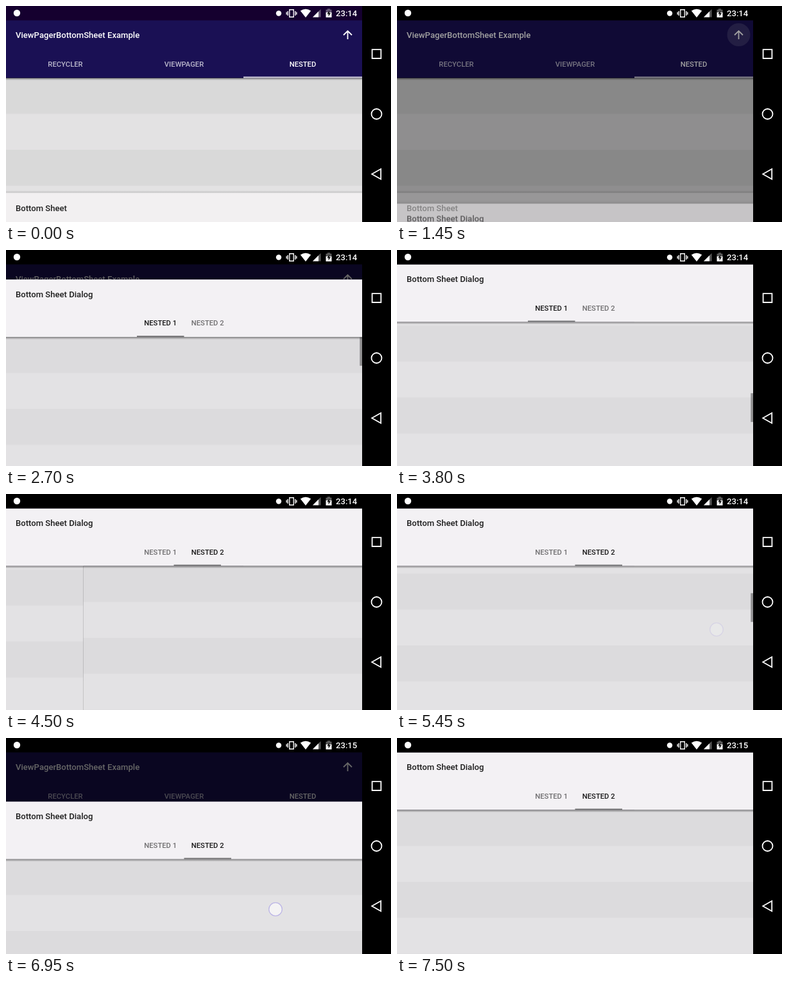
An HTML page that plays this animation: 600x338 px, repeating every 8 s.

```html
<!DOCTYPE html>
<html lang="en">
<head>
<meta charset="utf-8">
<title>Bottom sheet demo</title>
<style>
html, body { margin: 0; width: 100%; height: 100%; overflow: hidden; background: #000; }
#stage { display: block; }
text { font: 500 13.1px Roboto, sans-serif; }
.tab { font-size: 11.25px; text-anchor: middle; }
</style>
</head>
<body>
<svg id="stage" width="600" height="338" viewBox="0 0 600 338">
  <defs>
    <pattern id="mainRows" width="555" height="112.5" patternUnits="userSpaceOnUse">
      <rect width="555" height="112.5" fill="#e3e2e3"/>
      <rect width="555" height="56.25" fill="#d9d9d9"/>
    </pattern>
    <pattern id="pageRows" width="555" height="112.5" patternUnits="userSpaceOnUse">
      <rect width="555" height="112.5" fill="#e3e2e4"/>
      <rect width="555" height="56.25" fill="#dcdbdd"/>
    </pattern>
    <linearGradient id="below" x2="0" y2="1">
      <stop stop-opacity=".4"/><stop offset="1" stop-opacity="0"/>
    </linearGradient>
    <linearGradient id="above" x2="0" y2="1">
      <stop stop-opacity="0"/><stop offset="1" stop-opacity=".15"/>
    </linearGradient>
  </defs>

  <svg width="555" height="338">
    <svg y="112.5" width="555" height="226"><rect width="555" height="1125" fill="url(#mainRows)"/></svg>
    <rect y="112.5" width="555" height="4" fill="url(#below)"/>
    <rect y="22" width="555" height="90.5" fill="#1a1054"/>
    <g fill="#fff">
      <text x="15" y="50">ViewPagerBottomSheet Example</text>
      <g class="tabs">
        <text class="tab" x="92.5" y="94.5" opacity=".7">RECYCLER</text>
        <text class="tab" x="277.5" y="94.5" opacity=".7">VIEWPAGER</text>
        <text class="tab" x="462.5" y="94.5">NESTED</text>
      </g>
      <rect x="370" y="110.6" width="185" height="1.9" fill="#e8e6ee"/>
      <circle id="ripple" cx="532.5" cy="45" r="18"/>
      <path d="M532.5 52V39.5M526 45.5L532.5 39L539 45.5" fill="none" stroke="#fff" stroke-width="1.8"/>
    </g>
    <rect y="288.5" width="555" height="4" fill="url(#above)"/>
    <rect y="292.5" width="555" height="46" fill="#f2f0f1"/>
    <text x="15" y="320.7" fill="#212121">Bottom Sheet</text>
    <rect id="scrim" y="22" width="555" height="316"/>

    <g id="sheet">
      <rect y="-5" width="555" height="5" fill="url(#above)"/>
      <svg y="90" width="555" height="226">
        <g id="pager">
          <rect id="page1" width="555" height="1125" fill="url(#pageRows)"/>
          <g transform="translate(555)"><rect id="page2" width="555" height="1125" fill="url(#pageRows)"/></g>
        </g>
        <rect id="bar" x="551.3" width="3.7" height="45" fill="#000"/>
      </svg>
      <rect y="90" width="555" height="4" fill="url(#below)"/>
      <rect width="555" height="90" fill="#f3f1f4"/>
      <text x="15" y="27.5" fill="#1d1d1d">Bottom Sheet Dialog</text>
      <text class="tab" id="tab1" x="240.7" y="72">NESTED 1</text>
      <text class="tab" id="tab2" x="314.2" y="72">NESTED 2</text>
      <rect id="marker" y="88.1" width="73.5" height="1.9" fill="#707072"/>
    </g>
  </svg>

  <rect id="status" width="555" height="22.5"/>
  <g fill="#fff">
    <circle cx="17" cy="11" r="5.2"/>
    <circle cx="425" cy="11.5" r="4.2"/>
    <path d="M441.8 5.7h6.4v11.6h-6.4zM439.2 8v7M450.8 8v7M437.2 9.5v4M452.8 9.5v4" fill="none" stroke="#fff" stroke-width="1.4"/>
    <path d="M467 18L458.8 7.6Q467 1.8 475.2 7.6Z"/>
    <path d="M490.5 5V17.5H478Z" opacity=".35"/>
    <path d="M487 8.5V17.5H478Z"/>
    <path d="M498.5 5.7h2.3v-1.4h4.4v1.4h2.3v4.3h-9z" opacity=".35"/>
    <path d="M498.5 10h9v7.8h-9z"/>
    <path d="M504 7L500.3 12.4h2.3V16.4L506 11h-2z" fill="#111"/>
    <text id="clock" x="514" y="16.3"></text>
  </g>
  <path d="M555 0h45v338h-45z"/>
  <g fill="none" stroke="#fff" stroke-width="1.8">
    <path d="M570.6 68.2h13.8v13.8h-13.8zM570.2 263L584.2 255V271Z"/>
    <circle cx="577.5" cy="169" r="8"/>
  </g>
  <circle id="dot" r="10.3" fill="#fff" fill-opacity=".6" stroke="#bdb6e6" stroke-width="1.3"/>
</svg>

<script>
const LOOP = 8000, TOP = 22.5, PEEK = 278, ROWS = 1125, VIEW = 225.5;

// start, end, x0, y0, x1, y1
const touches = [
  [1100, 1200, 533, 45, 533, 45],
  [2280, 2450, 480, 290, 480, 226],
  [3250, 3350, 457, 282, 495, 226],
  [4120, 4300, 440, 197, 218, 197],
  [5250, 5350, 462, 266, 498, 212],
  [6100, 6200, 490, 205, 470, 262],
  [6650, 6950, 418, 190.5, 420, 268],
];
const barTimes = [[1250, 2700], [3250, 3850], [5250, 5850], [6100, 6600]];

const $ = id => document.getElementById(id);
const set = (id, attrs) => {
  for (const k in attrs) $(id).setAttribute(k, attrs[k]);
};
const seg = (t, a, b) => Math.min(1, Math.max(0, (t - a) / (b - a)));
const out = (t, a, b, k = 3) => 1 - (1 - seg(t, a, b)) ** k;
const smooth = (t, a, b) => (1 - Math.cos(Math.PI * seg(t, a, b))) / 2;
const mix = (a, b, u) => a + (b - a) * u;
const move = (x, y) => ({ transform: `translate(${x} ${y})` });
// opaque from a to b, then fades
const hold = (t, a, b, fade) => t < a ? 0 : 1 - seg(t, b, b + fade);

function sheetTop(t) {
  if (t < 2280) return PEEK + 63 * (1 - smooth(t, 1250, 1650));
  if (t < 6000) return mix(mix(PEEK, 214, seg(t, 2280, 2450)), TOP, out(t, 2450, 2950));
  return TOP + 77.5 * (seg(t, 6650, 6950) - out(t, 6950, 7450));
}

function draw(t) {
  const open = t >= 1250;
  set('status', { fill: open ? '#000' : '#15002f' });
  set('ripple', { opacity: 0.13 * seg(t, 1100, 1250) * (1 - seg(t, 1500, 1850)) });
  set('scrim', { opacity: 0.6 * seg(t, 1250, 1575) });
  set('sheet', { ...move(0, sheetTop(t)), opacity: smooth(t, 1250, 1650) });

  const page = 0.4 * seg(t, 4120, 4300) + 0.6 * out(t, 4300, 5000);
  const scroll1 = 556.75 * out(t, 3270, 3800, 1.7);
  const scroll2 = 419 * (out(t, 5270, 5800, 1.7) - out(t, 6120, 6600, 1.7));
  set('pager', move(-555 * page, 0));
  set('page1', move(0, -scroll1));
  set('page2', move(0, -scroll2));
  set('marker', { x: 204 + 73.5 * page });
  set('tab1', { 'fill-opacity': page < 0.5 ? 0.9 : 0.54 });
  set('tab2', { 'fill-opacity': page < 0.5 ? 0.54 : 0.9 });
  set('bar', {
    y: (page < 0.5 ? scroll1 : scroll2) / ROWS * VIEW,
    opacity: 0.35 * Math.max(...barTimes.map(([a, b]) => hold(t, a, b, 200))),
  });

  const [a, b, x0, y0, x1, y1] = touches.findLast(g => t >= g[0]) || touches[0];
  const u = seg(t, a, b);
  set('dot', { cx: mix(x0, x1, u), cy: mix(y0, y1, u), opacity: hold(t, a, b, 150) });
  $('clock').textContent = t < 5700 ? '23:14' : '23:15';
}

function tick() {
  draw(performance.now() % LOOP);
  requestAnimationFrame(tick);
}
tick();
</script>
</body>
</html>
```
